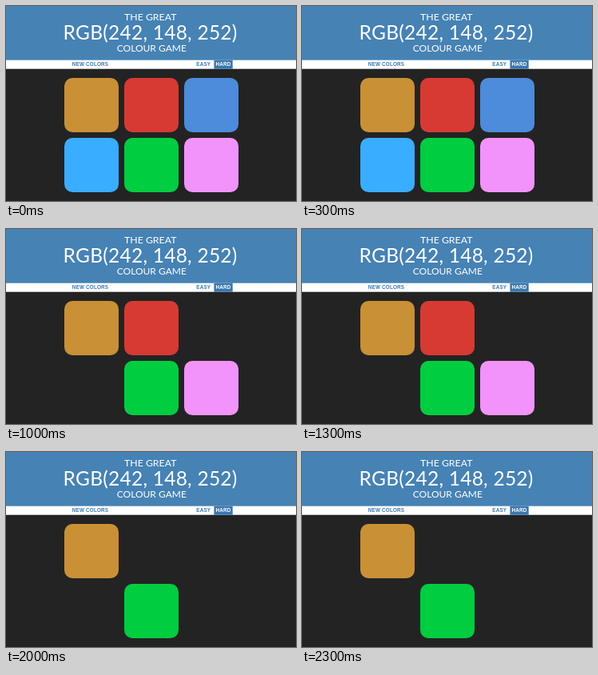
An HTML page for the animation above (2500 ms loop, 363 px wide and 244 px high).

```html
<!DOCTYPE html>
<html lang="en">
<head>
<meta charset="utf-8">
<title>Colour game</title>
<style>
  html, body { margin: 0; width: 100%; height: 100%; overflow: hidden; background: #232323; }
  svg { display: block; width: 363px; height: 244px; }
  .title { font-family: Lato, "Open Sans", sans-serif; fill: #fff; text-anchor: middle; }
  .button { font: bold 6.3px "Liberation Sans", Arial, sans-serif; letter-spacing: .2px; fill: #3a78ae; }
  .button .on { fill: #fff; }
  .blue { animation: hide-1 2.5s step-end infinite; }
  .sky  { animation: hide-2 2.5s step-end infinite; }
  .pink { animation: hide-3 2.5s step-end infinite; }
  .red  { animation: hide-4 2.5s step-end infinite; }
  @keyframes hide-1 { 0% { opacity: 1 } 20%, 100% { opacity: 0 } }
  @keyframes hide-2 { 0% { opacity: 1 } 40%, 100% { opacity: 0 } }
  @keyframes hide-3 { 0% { opacity: 1 } 60%, 100% { opacity: 0 } }
  @keyframes hide-4 { 0% { opacity: 1 } 80%, 100% { opacity: 0 } }
</style>
</head>
<body>
<svg viewBox="0 0 363 244">
  <defs><rect id="tile" width="68" height="68" rx="10.2"/></defs>
  <rect width="363" height="244" fill="#232323"/>
  <rect width="363" height="68" fill="#4682b4"/>
  <rect y="67.7" width="363" height="11" fill="#fff"/>

  <g class="title">
    <text x="180.7" y="18" font-size="12.3">THE GREAT</text>
    <text x="180.6" y="42" font-size="24.5" letter-spacing=".25">RGB(242, 148, 252)</text>
    <text x="182.3" y="57.2" font-size="12">COLOUR GAME</text>
  </g>

  <g class="button">
    <rect x="260.4" y="67.7" width="23.3" height="11"/>
    <text x="82.8" y="75.2">NEW COLORS</text>
    <text x="238.3" y="75.2">EASY</text>
    <text x="262.4" y="75.2" class="on">HARD</text>
  </g>

  <use href="#tile" x="73" y="90" fill="#c99035"/>
  <use href="#tile" x="148" y="90" fill="#d63a33" class="red"/>
  <use href="#tile" x="223" y="90" fill="#4d8bdb" class="blue"/>
  <use href="#tile" x="73" y="165" fill="#39adff" class="sky"/>
  <use href="#tile" x="148" y="165" fill="#00cd40"/>
  <use href="#tile" x="223" y="165" fill="#f293fb" class="pink"/>
</svg>
</body>
</html>
```
